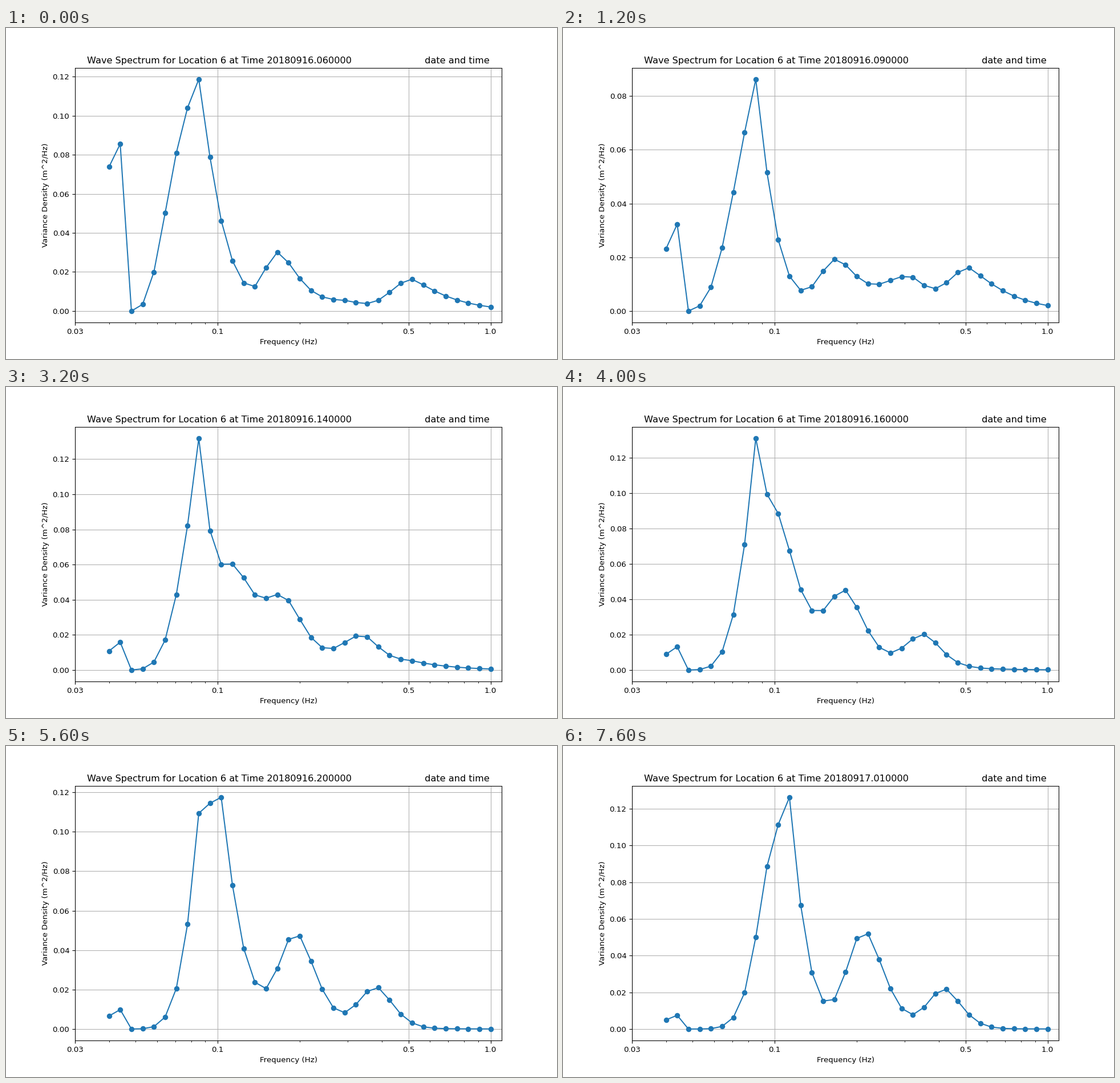
A matplotlib script that plays this animation: 966 px wide and 580 px high, repeating every 8000 ms.

```python
import matplotlib.pyplot as plt
import numpy as np
from matplotlib.animation import FuncAnimation

FRAMES, INTERVAL = 20, 400
START_HOUR = 6
SCALE = 0.966  # text, line and marker size relative to the defaults

BANDS = np.arange(35)
FREQ = 0.04 * 25 ** (BANDS / 34)

# Key points of the wave systems that do not follow a simple law
KEY_HOURS = [0, 3, 8, 10, 14, 19]
SWELL_HEIGHT = [1187, 862, 1270, 1078, 590, 410]
YOUNG_SWELL_BAND = [14, 13.5, 11.5, 10.4, 10, 11]
YOUNG_SWELL_HEIGHT = [0, 0, 530, 720, 1100, 1240]
WIND_SEA_HEIGHT = [275, 185, 270, 385, 475, 535]


def power(factor, exponent):
    return lambda distance: factor * distance ** exponent


def bell(width):
    return power(0.5 / width ** 2, 2)


def peak(center, height, rise, fall):
    """One wave system: rise and fall give the log decay on its two flanks."""
    below = np.maximum(center - BANDS, 0)
    above = np.maximum(BANDS - center, 0)
    return height * np.exp(-rise(below) - fall(above))


def spectrum(hour):
    """Variance density in every band as a sum of drifting wave systems."""
    def key(values):
        return np.interp(hour, KEY_HOURS, values)

    steepness = 0.143 + 0.11 * min(hour, 10.5)
    curvature = 0.35 + 0.3 * np.exp(-hour / 2.5)
    swell = peak(8 + 0.14 * max(hour - 14, 0), key(SWELL_HEIGHT),
                 lambda d: steepness * np.expm1(curvature * d),
                 power(0.41 + 0.035 * hour, 1.2))
    young_swell = peak(key(YOUNG_SWELL_BAND), key(YOUNG_SWELL_HEIGHT),
                       bell(1.6), power(max(0.035 * hour - 0.05, 0.1), 1.2))
    wind_sea = peak(15 + 0.032 * hour ** 1.5, key(WIND_SEA_HEIGHT),
                    bell(1.1 + 0.4 * min(hour / 3, 1)), power(0.21, 1.7))
    chop = peak(21 + 0.2 * hour, 222 - 172 * np.exp(-hour / 5),
                bell(1.4 + 1.9 * np.exp(-hour / 6)), power(0.28, 1.7))
    ripples = peak(27, 3 + 160 / (1 + np.exp(hour - 7)),
                   bell(1.9), power(0.2, 1.2))
    density = swell + young_swell + wind_sea + chop + ripples

    # The lowest bands hold a fading residue, cut off by an empty band
    density[0] = 738 / (1 + 0.73 * hour)
    density[1] = 856 / (1 + 0.55 * hour)
    density[2] = 0
    return density * 1e-4


def title(hour):
    day, clock = divmod(START_HOUR + hour, 24)
    stamp = f"201809{16 + day}.{clock:02d}0000"
    return f"Wave Spectrum for Location 6 at Time {stamp}" + " " * 25 + "date and time"


plt.rcParams["font.family"] = "DejaVu Sans"
for name in ("font.size", "lines.linewidth", "lines.markersize", "grid.linewidth",
             "axes.linewidth", "axes.titlepad", "axes.labelpad",
             "xtick.major.size", "xtick.major.pad", "xtick.minor.size",
             "ytick.major.size", "ytick.major.pad"):
    plt.rcParams[name] *= SCALE

fig, ax = plt.subplots(figsize=(9.66, 5.8), dpi=100)
line, = ax.plot(FREQ, spectrum(0), marker="o", color="#1f77b4")
ax.set_xscale("log")
ax.set_xlim(0.03, 1.1)
ax.set_xticks([0.03, 0.1, 0.5, 1.0], labels=["0.03", "0.1", "0.5", "1.0"])
ax.set_xlabel("Frequency (Hz)")
ax.set_ylabel("Variance Density (m^2/Hz)")
ax.grid(True)


def update(frame):
    density = spectrum(frame)
    margin = 0.05 * density.max()
    line.set_ydata(density)
    ax.set_ylim(-margin, density.max() + margin)
    ax.set_title(title(frame))
    return line,


anim = FuncAnimation(fig, update, frames=FRAMES, interval=INTERVAL,
                     repeat=True, repeat_delay=0)
plt.show()
```
